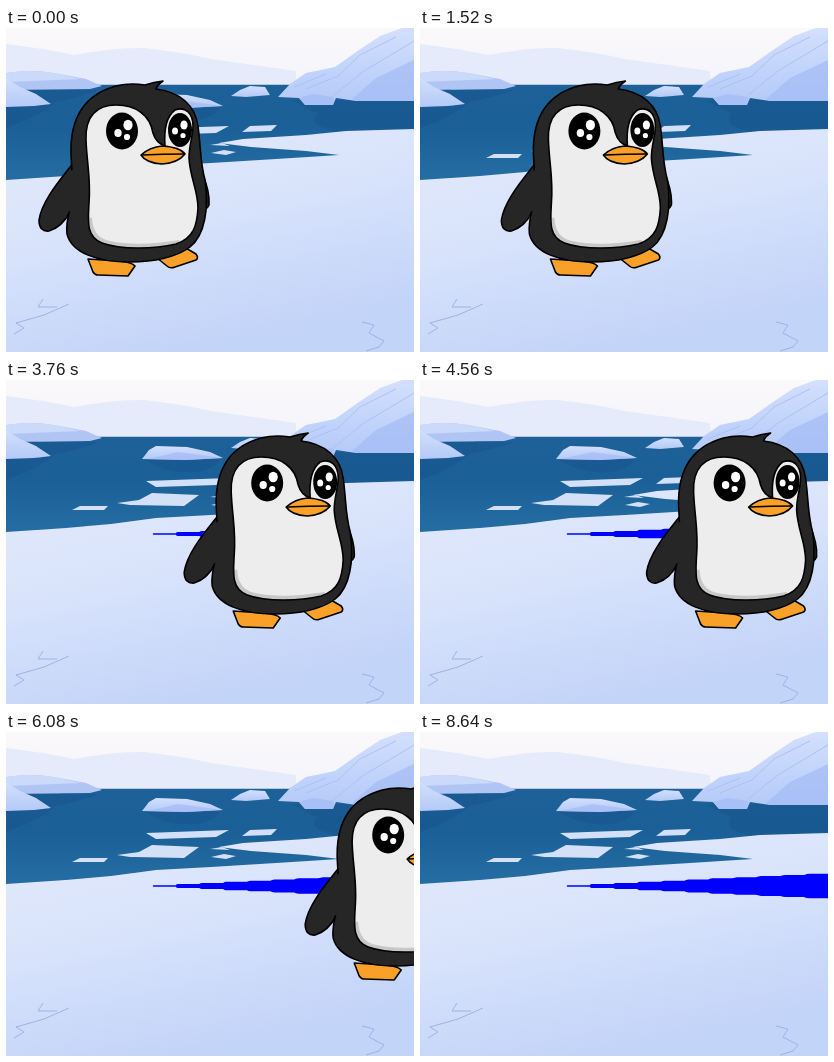
An HTML page for the animation above (8720 ms loop, 408 px wide and 324 px high).

```html
<!DOCTYPE html>
<html lang="en">
<head>
<meta charset="utf-8">
<title>Penguin with a pen</title>
<style>
html, body { margin: 0; width: 100%; height: 100%; overflow: hidden; background: #d9e3fa; }
svg { display: block; width: 408px; height: 324px; }
</style>
</head>
<body>
<svg viewBox="0 0 408 324">
  <defs>
    <linearGradient id="sky" x2="0" y2="1">
      <stop stop-color="#faf8f9"/><stop offset="1" stop-color="#f3f4fc"/>
    </linearGradient>
    <linearGradient id="sea" x2="0" y2="1">
      <stop stop-color="#1d6198"/><stop offset=".4" stop-color="#1a5f97"/><stop offset="1" stop-color="#256ea4"/>
    </linearGradient>
    <linearGradient id="snow" x2=".4" y2="1">
      <stop stop-color="#e2e9fb"/><stop offset=".5" stop-color="#d8e3fb"/><stop offset="1" stop-color="#c3d4f9"/>
    </linearGradient>
    <linearGradient id="ice" x2="0" y2="1">
      <stop stop-color="#d3e0fd"/><stop offset="1" stop-color="#b3c9f8"/>
    </linearGradient>
    <path id="belly" d="M80 112C79 88 91 77 110 77C130 77 144 87 147 105Q150 115 159 118Q157 91 169 82C180 78 187 86 187 98C187 108 183 117 183 130C184 150 192 162 192 180C191 197 188 210 170 216C149 221 115 222 96 215C80 209 82 193 83 175C85 151 81 137 80 112Z"/>
    <clipPath id="bellyClip"><use href="#belly"/></clipPath>
  </defs>

  <!-- sky, hills and sea -->
  <path fill="url(#sky)" d="M0 0H408V60H0Z"/>
  <path fill="#e6ebfc" d="M0 16Q35 20 68 27Q110 19 138 20Q175 24 205 31L290 43V58H0Z"/>
  <path fill="url(#sea)" d="M0 56.7H408V155H0Z"/>
  <path fill="#174f87" d="M0 62H94Q70 70 50 74Q30 90 0 100ZM285 72H408V100L330 104Q300 96 312 86ZM140 80L215 79Q208 90 190 92Q160 94 140 80Z" opacity=".35"/>
  <path fill="#b0c5f4" d="M0 45Q25 41 48 45L80 51L96 58L84 61L0 62Z"/>
  <path fill="#cbdafb" d="M0 45Q25 41 48 45L75 51L0 54Z"/>
  <path fill="url(#ice)" d="M0 50L14 59L30 66L45 76L28 78L0 79Z"/>

  <!-- icebergs -->
  <g fill="url(#ice)">
    <path d="M272 69L284 56L300 45L329 39L353 22L374 8L396 0H408V73L350 73L330 70L327 77L299 77L293 70Z"/>
    <path d="M136 79L143 70L150 66L181 67L204 72L217 78L180 80Z"/>
    <path d="M225 68L234 62L244 58L259 59L264 67L240 69Z"/>
  </g>
  <path fill="#a4bdf6" d="M346 71L370 50L408 32V73H350ZM150 77L172 72L217 78L180 80L140 79ZM293 70L308 66L328 69L327 77H299Z" opacity=".7"/>
  <path fill="none" stroke="#aac2f6" d="M300 61L332 48L354 27L390 9M328 67L358 43L408 13M288 59L320 46"/>

  <!-- floes and shore -->
  <path fill="#d3e0f8" d="M140 101L223 98L210 105L150 107ZM111 123L133 120L146 113L193 115L178 126L124 125ZM66 130L74 126L102 126L98 130ZM236 104L244 98L271 97L265 103ZM205 125L218 122L230 124L220 127ZM204 117L216 115L224 118Z"/>
  <path fill="url(#snow)" d="M0 152L60 148L105 144L150 138L205 135L270 131L333 127L300 123L245 119L213 115L237 111L300 107L340 103L408 101V324H0Z"/>
  <path fill="none" stroke="#9db3e6" d="M37 271L32 279L51 279M63 276L38 287L10 295L18 300L8 306M356 294L368 297L363 305L378 313L373 319L360 323"/>

  <g id="trail" stroke="#00f" stroke-linecap="round"></g>

  <g id="penguin" stroke="#000" stroke-width="1.6" stroke-linejoin="round">
    <path fill="#262626" d="M196 145Q204 163 203 177Q200 184 194 181Z"/>
    <path fill="#f9a029" d="M82 231L87 244Q89 247 92 247L122 248L129 238Q126 234 112 233ZM151 230L161 238Q164 241 169 239L190 232Q193 230 190 226L178 219Z"/>
    <path fill="#262626" d="M68 134C55 151 36 172 33 192Q33 204 43 203Q56 199 64 184Z"/>
    <path fill="#262626" d="M65 126C64 91 77 67 110 58C122 55 132 56 139 57Q148 54 157 53Q151 57 150 61C174 64 189 77 192 98C195 120 194 134 199 152C203 180 199 207 184 219C171 229 148 234 124 234C91 234 66 225 61 206C59 191 66 178 67 164Z"/>
    <path stroke="none" fill="#262626" d="M62 145L69 140V180L62 184Z"/>
    <use href="#belly" fill="#ededed" stroke="none"/>
    <path clip-path="url(#bellyClip)" fill="none" stroke="#c8c8c8" stroke-width="10" d="M81 190Q82 214 103 218Q132 224 174 217"/>
    <use href="#belly" fill="none"/>
    <g stroke="none">
      <ellipse cx="116" cy="103" rx="16" ry="18.5"/>
      <ellipse cx="174" cy="102" rx="12" ry="17"/>
      <g fill="#fff">
        <ellipse cx="122" cy="97" rx="4.6" ry="5.2"/>
        <ellipse cx="112" cy="105" rx="3.7" ry="4"/>
        <circle cx="121" cy="109" r="3.1"/>
        <ellipse cx="178" cy="97" rx="3.6" ry="4.6"/>
        <ellipse cx="169" cy="103" rx="3" ry="3.6"/>
        <circle cx="177" cy="107.5" r="2.6"/>
      </g>
    </g>
    <path fill="#f9a029" d="M135 127Q144 119 156 118Q174 119 179 126Q172 135 156 136Q140 135 135 127Z"/>
    <path fill="none" d="M136 127Q157 126 178 126"/>
  </g>
</svg>
<script>
const LOOP = 8720, DELAY = 220, BEAT = 520, STEP = 24.2;
const penguin = document.getElementById('penguin');
const trail = document.getElementById('trail');
const segments = [];

// every hop leaves one pen stroke, each thicker than the last
for (let i = 0; i < 12; i++) {
  const line = document.createElementNS('http://www.w3.org/2000/svg', 'path');
  line.setAttribute('d', `M${147.5 + STEP * i} 154h${STEP}`);
  line.setAttribute('stroke-width', 1.5 + 2.3 * i);
  segments.push(trail.appendChild(line));
}

function draw(now) {
  const hops = Math.max(0, Math.floor((now % LOOP - DELAY) / BEAT));
  penguin.setAttribute('transform', `translate(${STEP * hops} 0)`);
  segments.forEach((line, i) => line.setAttribute('visibility', i < hops ? 'visible' : 'hidden'));
}

const start = performance.now();
function tick() {
  draw(performance.now() - start);
  requestAnimationFrame(tick);
}
tick();
</script>
</body>
</html>
```
